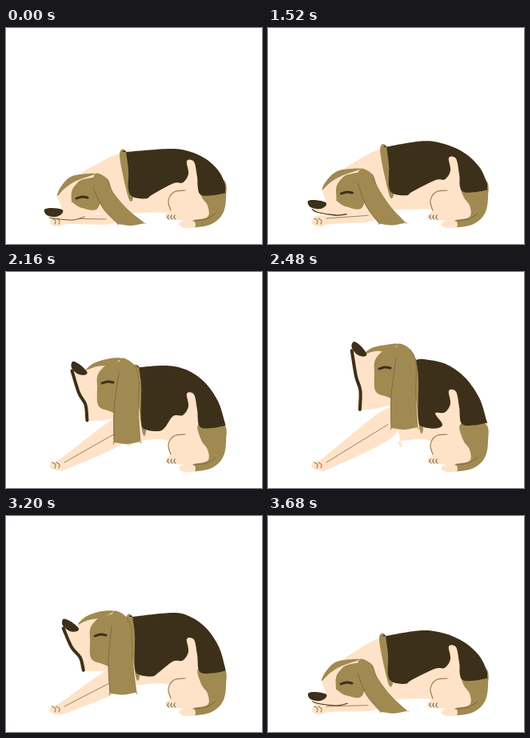
An HTML page with a canvas that plays this animation: 320 px wide and 270 px high, repeating every 3.84 s.

```html
<!DOCTYPE html>
<html lang="en">
<head>
<meta charset="utf-8">
<title>Yawning dog</title>
<style>
html, body { margin: 0; height: 100%; overflow: hidden; background: #fff; }
canvas { display: block; width: 100vw; height: 100vh; }
</style>
</head>
<body>
<canvas id="stage" width="320" height="270"></canvas>
<script>
const ctx = document.getElementById('stage').getContext('2d');
const CREAM = '#ffe3c8', TAN = '#a08a52', SHADE = '#806c3a', DARK = '#3d301a', LINE = '#9c8052';
const LOOP = 3840;

// Start time and yawn: degrees the muzzle is raised, 0 when asleep
const steps = [
  [0, 0], [1200, 0.4], [1360, 3], [1520, 6], [1680, 17], [1840, 30], [2000, 40],
  [2160, 52], [2320, 59], [2480, 62], [2720, 65], [3200, 44], [3520, 30], [3680, 3]
];

// Yawn, then eye, front top of the saddle, and highest point of the back
const keys = [
  [0, 95, 212, 150, 155, 205, 151],
  [3, 98, 209, 147, 150, 192, 143],
  [30, 102, 182, 157, 138, 207, 128],
  [44, 118, 149, 158, 126, 208, 121],
  [52, 127, 138, 166, 119, 200, 117],
  [62, 146, 120, 185, 110, 194, 109]
];

function keyAt(yawn) {
  let i = 0;
  while (i < keys.length - 2 && yawn > keys[i + 1][0]) i++;
  const [a, b] = [keys[i], keys[i + 1]];
  const mix = (yawn - a[0]) / (b[0] - a[0]);
  return a.map((v, k) => v + (b[k] - v) * mix).slice(1);
}

function turn([x, y], degrees) {
  const a = degrees * Math.PI / 180, c = Math.cos(a), s = Math.sin(a);
  return [x * c - y * s, x * s + y * c];
}
const add = ([x, y], [dx, dy]) => [x + dx, y + dy];
const middle = ([x, y], [u, v]) => [(x + u) / 2, (y + v) / 2];

// Smooth curve through points; a doubled point makes a corner
function trace(pts, closed) {
  const n = pts.length;
  const at = i => closed ? pts[(i + n) % n] : pts[Math.max(0, Math.min(n - 1, i))];
  ctx.beginPath();
  ctx.moveTo(...pts[0]);
  for (let i = 0; i < (closed ? n : n - 1); i++) {
    const [a, b, c, d] = [at(i - 1), at(i), at(i + 1), at(i + 2)];
    ctx.bezierCurveTo(b[0] + (c[0] - a[0]) / 6, b[1] + (c[1] - a[1]) / 6,
      c[0] - (d[0] - b[0]) / 6, c[1] - (d[1] - b[1]) / 6, c[0], c[1]);
  }
}
function fill(pts, color) {
  trace(pts, true);
  ctx.fillStyle = color;
  ctx.fill();
}
function line(pts, color, width) {
  trace(pts, false);
  ctx.strokeStyle = color;
  ctx.lineWidth = width;
  ctx.stroke();
}

function drawBody(eye, front, peak, yawn) {
  const [sx, sy] = front, [px, py] = peak;
  const arc = [0, 20, 40, 60, 78].map(d => {
    const [c, s] = turn([1, 0], d);
    return [px + (275 - px) * s, 206 - (206 - py) * c];
  });
  const belly = Math.max(211, 231 - yawn * 0.65);
  const neck = add(eye, [-8, -20]);
  fill([neck, add(middle(neck, front), [-2, -5]), front, ...arc, [275, 206],
    [262, 232], [225, 239], [203, belly], [165, belly], [eye[0] + 20, belly]], CREAM);

  // haunch and tail
  fill([[206, 208], [222, 200], [243, 205], [250, 228], [234, 240], [212, 240], [200, 238], [200, 233], [206, 228], [203, 218]], CREAM);
  fill([[241, 190], [272, 190], [275, 212], [271, 232], [257, 245], [234, 249], [232, 241], [252, 236], [252, 222], [244, 210]], TAN);
  fill([[234, 240], [219, 242], [217, 247], [224, 250], [236, 249]], CREAM);
  line([[206, 228], [203, 216], [210, 205], [224, 203]], LINE, 1.2);
  line([[234, 241], [250, 239], [262, 232]], SHADE, 1);
  for (const x of [203, 207, 211]) line([[x, 234], [x - 1, 237], [x + 1, 239]], DARK, 1);

  // saddle with the pale stripe cut into its hem
  const top = 149 + (py - 110) * 0.42, hem = top + 41;
  const low = [sx + 9, top + 45];
  fill([[sx - 8, sy + 3], front, [sx + 5, sy + 40], low, add(low, [-4, 5]), [sx - 1, sy + 42]], TAN);
  fill([front, front, ...arc, [274, hem - 1], [274, hem - 1], [258, hem + 2], [242, hem], [239, top + 20],
    [235, top + 1], [226, top], [228, top + 16], [221, top + 27], [209, top + 28],
    add(low, [24, -3]), add(low, [16, 2]), low, add(low, [-6, -9]), [sx + 3, sy + 24]], DARK);
}

function drawLegs(yawn) {
  const shoulder = [125 + yawn * yawn * 0.0065, 239 - yawn * 0.78];
  const half = 6 + yawn * 0.15;
  fill([[67, 234], [58, 236], [55, 244], [65, 248], [79, 245], add(shoulder, [6, half]),
    add(shoulder, [10, -half]), add(shoulder, [-10, -half])], CREAM);
  line([[73, 238], shoulder], LINE, 1);
  for (const x of [61, 66]) line([[x - 3, 238], [x + 1, 241], [x, 245]], LINE, 1.2);
}

function drawHead(eye, yawn) {
  const at = (x, y) => add(eye, [x, y]);
  const brow = (x, y) => add(eye, turn([x, y], yawn / 2));
  const tip = add(eye, turn([-36, 18], yawn));
  const snout = (x, y) => add(tip, turn([x, y], yawn * 0.7));

  const forehead = [at(17, -30), brow(-12, -27), brow(-26, -14), brow(-31, -2)];
  const mouth = [snout(-5, 7), at(-36, 26 - yawn / 4), at(-12 - yawn * 0.3, 28),
    at(3 - yawn * 0.55, 24 + yawn * 0.45)];
  const drop = Math.min(22, yawn * 0.75);

  fill([...forehead, snout(10, -4), snout(-10, -3), ...mouth, at(22, 15 + drop), at(25, -20)], CREAM);
  line(mouth, DARK, Math.min(4, 0.8 + yawn * 0.08));
  fill([...forehead, brow(-21, -12), brow(-7, -21)], TAN);
  fill([at(2, -23), at(-8, -16), at(-13, -7), at(-13, 6), at(-12, 6 + drop), at(0, 13 + drop),
    at(20, 13 + drop), at(25, -22)], TAN);

  // the ear slides forward and hangs longer as the head rises
  const end = at(Math.max(25, 62 - yawn * 0.75), Math.min(75, 33 + yawn * 0.9));
  const right = add(end, [16, -1]), left = add(end, [-17, 0]);
  const outer = [at(17, -30), at(32, -23), at(39, -6), add(middle(at(40, -6), right), [-2, 2]), right];
  const inner = [left, add(middle(at(14, -10), left), [-3, 2]), at(14, -12)];
  fill([...outer, right, add(end, [0, 2]), left, ...inner], TAN);
  line(outer.slice(1), SHADE, 0.7);
  line(inner, SHADE, 1);

  fill([snout(-11, -3), snout(-2, -5), snout(11, -3), snout(11, 2), snout(3, 6), snout(-8, 4)], DARK);
  line([at(-7, 1), at(0, -1), at(7, 0)], DARK, 3);
}

function draw(yawn) {
  const [ex, ey, sx, sy, px, py] = keyAt(yawn);
  ctx.clearRect(0, 0, 320, 270);
  drawBody([ex, ey], [sx, sy], [px, py], yawn);
  drawLegs(yawn);
  drawHead([ex, ey], yawn);
}

ctx.lineCap = ctx.lineJoin = 'round';
const start = performance.now();
function tick() {
  const t = (performance.now() - start) % LOOP;
  draw(steps.filter(s => s[0] <= t).pop()[1]);
  requestAnimationFrame(tick);
}
tick();
</script>
</body>
</html>
```
